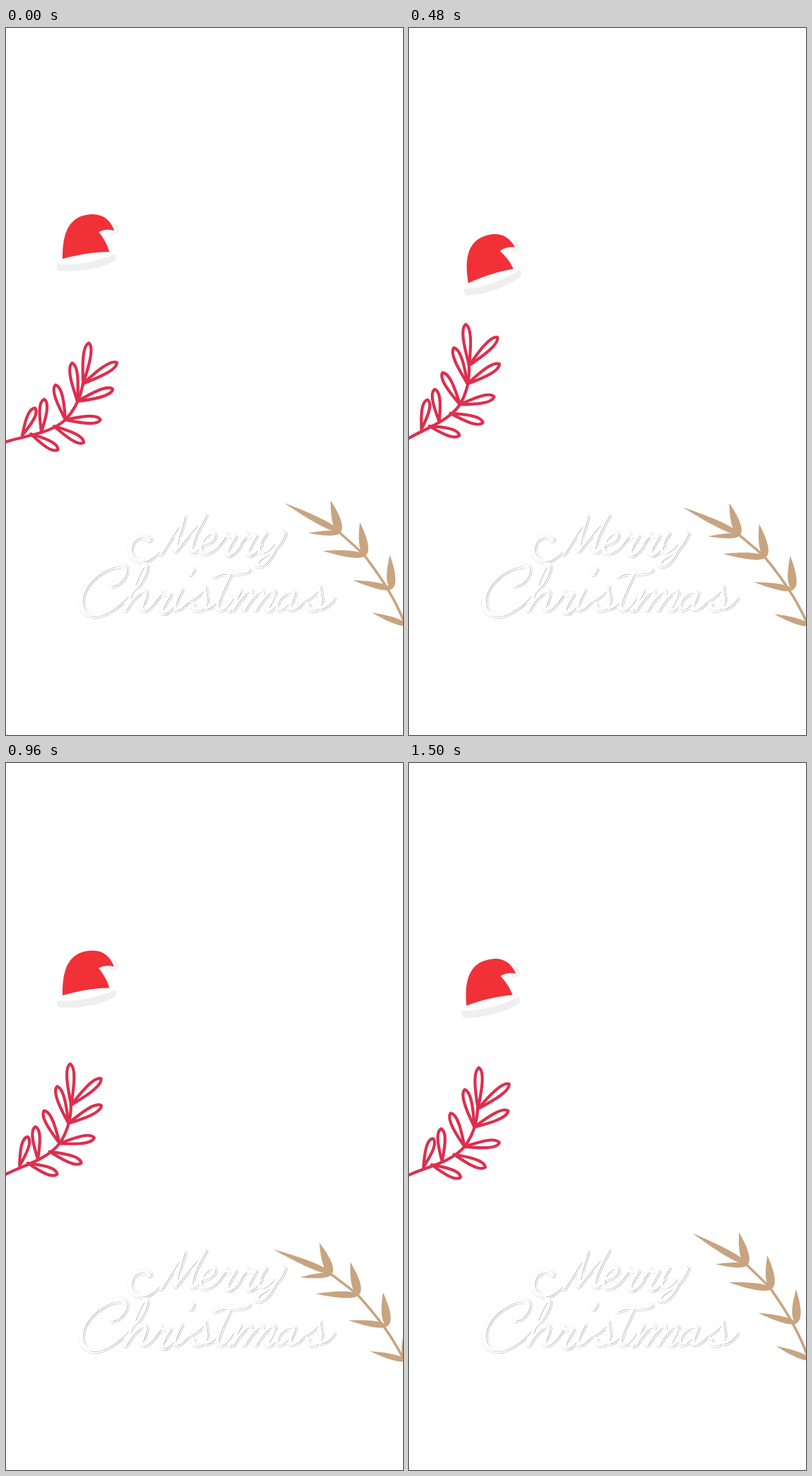
An HTML page that plays this animation: 561 px wide and 998 px high, repeating every 1530 ms.

```html
<!DOCTYPE html>
<html lang="en">
<head>
<meta charset="utf-8">
<title>Merry Christmas</title>
<style>
  html, body { margin: 0; width: 100%; height: 100%; overflow: hidden; background: #fff; }
  svg { display: block; width: 100vw; height: 100vh; }
  #lettering, #berry { fill: none; stroke-linecap: round; stroke-linejoin: round; }
  #berry { stroke: #dc2f4e; stroke-width: 4.2; }
  #reed { fill: #c8a480; }
</style>
</head>
<body>
<svg viewBox="0 0 561 998" role="img" aria-label="Merry Christmas">
  <g id="lettering"></g>

  <g id="hat">
    <path fill="#efefef" d="M72 333C100 336 130 329 155 319C157 325 156 328 150 331C128 341 98 345 76 343C72 341 71 337 72 333Z"/>
    <path fill="#f13037" d="M80 326C80 300 83 263 123 263C138 263 148 272 153 286C146 284 138 284 131 288C137 295 143 305 146 316C125 316 100 320 80 326Z"/>
    <path fill="none" stroke="#ececec" stroke-width="2" d="M153 277C156 278 156 281 157 283C159 287 156 288 154 289C152 292 149 291 147 290"/>
  </g>

  <g id="berry">
    <path d="M-22 594C10 574 55 579 84 553C99 537 106 520 109 500"/>
  </g>

  <g id="reed">
    <path fill="none" stroke="#c8a480" stroke-width="3.6" d="M572 860C556 822 546 796 506 744C494 732 482 722 470 711"/>
  </g>
</svg>
<script>
const $ = id => document.getElementById(id);

function addPath(parent, attrs) {
  const p = document.createElementNS('http://www.w3.org/2000/svg', 'path');
  for (const k in attrs) p.setAttribute(k, attrs[k]);
  parent.append(p);
}

// Symmetric leaf; "near" and "far" are the edge's control points
// as fractions of its length and width.
function addLeaf(parent, x, y, angle, len, width, near, far) {
  const at = ([a, b], side) => `${a * len} ${b * width * side}`;
  addPath(parent, {
    d: `M0 0C${at(near, -1)} ${at(far, -1)} ${len} 0C${at(far, 1)} ${at(near, 1)} 0 0Z`,
    transform: `translate(${x} ${y}) rotate(${angle})`
  });
}

// Red sprig: a stem point, then the directions of its leaves.
// The leaves get shorter from the top down.
let leaf = 0;
for (const [x, y, ...angles] of [
  [109, 502, -82, -32], [101, 527, -98, -19], [84, 553, -106, 0],
  [68, 562, 29], [50, 570, -85], [35, 573, 30], [23, 575, -65]
])
  for (const angle of angles)
    addLeaf($('berry'), x, y, angle, 58 - 1.7 * leaf++, 12, [.4, .35], [.9, .75]);

// Tan sprig: each node has an upright and a sideways leaf,
// turned a little further at every node.
const blade = (x, y, angle, len, width) =>
  addLeaf($('reed'), x, y, angle, len, width, [.1, .75], [.5, .6]);
blade(473, 712, -152.6, 90, 9);
[[472, 713, 45], [508, 745, 61], [545, 792, 56], [567, 843, 53]].forEach(([x, y, len], i) => {
  blade(x, y, -106 + 6.5 * i, 48, 12);
  blade(x, y, -180 + 6.5 * i, len, len / 6.5);
});

// Script letters as pen strokes from the baseline: [advance, path].
const hump = 'c8-14 18-25 24-25 6 2-4 18-8 25';
const glyphs = {
  M: [100, 'M27-18c-8-9-25-4-27 13-1 14 14 22 28 13 20-13 34-39 47-57L43 1M75-49C70-30 64-15 64-3C79-22 92-38 105-51C96-35 86-18 86-4q3 6 13-4'],
  e: [25, 'M0-12c12 0 22-10 17-14-8-4-20 12-18 22 2 9 16 4 26-8'],
  r: [29, 'M0-12l10-13c2 5 8 3 12 3-5 8-12 18-10 23 2 5 10 0 17-11'],
  y: [40, 'M7-26c-8 10-12 24-6 26 9 2 20-14 31-28-10 20-18 41-30 46-8 3-8-5 2-11 12-7 25-18 30-33'],
  C: [63, 'M47-36c12-2 24-20 16-26-18-8-62 22-60 51 1 20 20 22 38 12 12-7 24-18 32-28'],
  h: [42, 'M12-27c14-12 22-34 18-36-6-2-20 38-28 62 8-14 18-26 26-26 8 2-6 20-2 25 4 3 10-3 16-10'],
  i: [21, 'M9-28c-5 10-11 20-8 25 4 4 12-4 20-13M23-52l3-5'],
  s: [35, 'M0-14c8-4 18-12 22-18 0 12 6 22-2 28-6 5-14 3-14-3M22-4c8 1 14-6 19-12'],
  t: [23, 'M24-54c-8 18-21 40-19 50 4 8 14-2 20-12M2-49c14-8 30 0 46-7'],
  m: [68, 'M0-1l14-26M4-2' + hump.repeat(3) + 'c4 4 10-4 14-8'],
  a: [36, 'M22-24c-10-6-26 8-24 19 3 8 16-2 24-18-4 10-8 18-4 20 6 2 12-6 18-11']
};

function write(word, x, y, attrs, dx, dy) {
  for (const ch of word) {
    const [advance, d] = glyphs[ch];
    addPath($('lettering'), { d, ...attrs, transform: `translate(${x + dx} ${y + dy})` });
    x += advance;
  }
}

// Alternating grey and white layers leave only thin rims.
for (const [stroke, width, dx, dy] of [
  ['#b8b8b8', 9.4, .2, .2], ['#fff', 9, -.2, -.2],
  ['#999', 4, .7, .2], ['#fff', 4, .1, -.1]
]) {
  const attrs = { stroke, 'stroke-width': width };
  write('Merry', 176, 740, attrs, dx, dy);
  write('Christmas', 104, 822, attrs, dx, dy);
}

// Swinging parts: pivot and angle in degrees at a few key times.
const LOOP = 1530, STEP = 30;
const times = [0, 240, 480, 840, 1080, 1290, 1500];
const parts = [
  { el: $('hat'), pivot: '300 318', angles: [0, -8, -9, -1.7, -.3, -2.1, -4.3] },
  { el: $('berry'), pivot: '-17 595', angles: [0, -4.8, -12.9, -11.9, -6.6, -4.8, -6.6] },
  { el: $('reed'), pivot: '575 861', angles: [0, -.25, -1.85, -4.6, -4.4, -1.6, 2.2] }
];

function slope(v, i) {
  const a = Math.max(i - 1, 0), b = Math.min(i + 1, v.length - 1);
  return (v[b] - v[a]) / (times[b] - times[a]);
}

// Smooth cubic curve through the key angles.
function angleAt(v, t) {
  let i = 0;
  while (i < times.length - 2 && t >= times[i + 1]) i++;
  const h = times[i + 1] - times[i], s = (t - times[i]) / h, r = 1 - s;
  return v[i] * r * r * (1 + 2 * s) + v[i + 1] * s * s * (3 - 2 * s) +
    h * s * r * (slope(v, i) * r - slope(v, i + 1) * s);
}

const start = performance.now();
function draw(now) {
  const t = Math.floor(Math.max(0, now - start) % LOOP / STEP) * STEP;
  for (const { el, pivot, angles } of parts)
    el.setAttribute('transform', `rotate(${angleAt(angles, t).toFixed(3)} ${pivot})`);
  requestAnimationFrame(draw);
}
draw(start);
</script>
</body>
</html>
```
